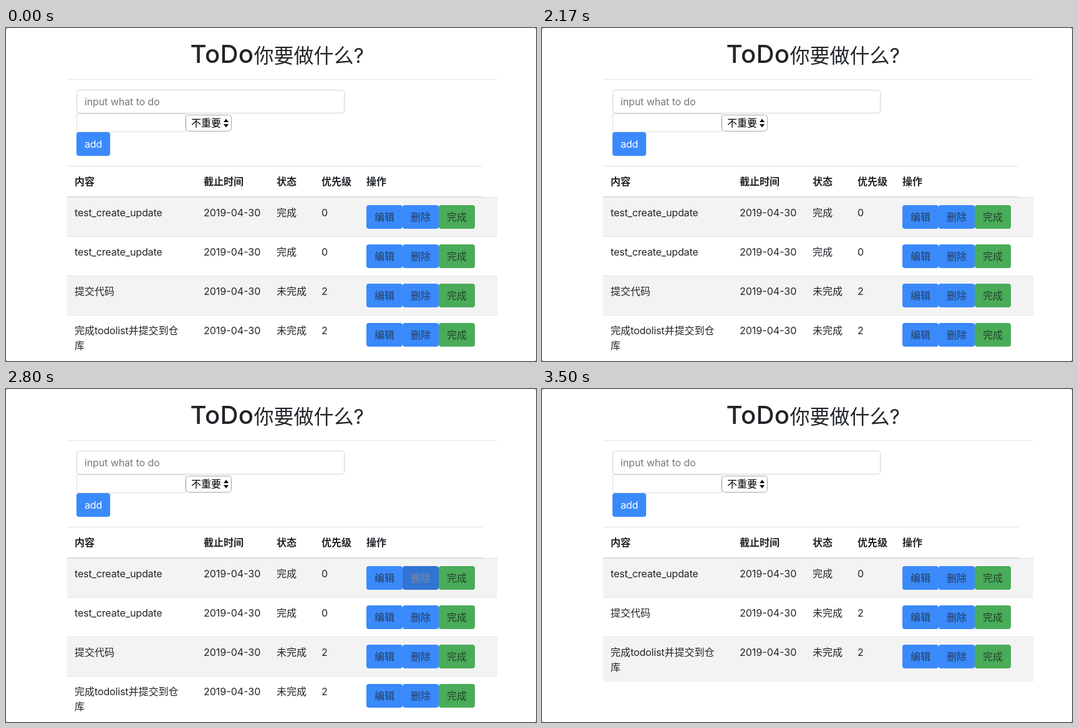
These frames come from a looping animation (850 px wide and 534 px high, 3570 ms). An HTML page:

```html
<!DOCTYPE html>
<html lang="zh-CN">
<head>
<meta charset="utf-8">
<title>ToDo</title>
<style>
html, body { margin: 0; width: 100%; height: 100%; overflow: hidden; background: #fff; }
svg { display: block; width: 850px; height: 534px; }
text { font: 400 16px Inter, "Noto Sans CJK SC", "Noto Sans CJK", sans-serif; fill: #212529; white-space: pre; }
.latin { letter-spacing: -.13px; }
.head { font-weight: 700; }
.title { font-size: 40px; font-weight: 500; letter-spacing: .4px; }
.small { font-size: 32px; }
</style>
</head>
<body>
<svg id="stage" viewBox="0 0 850 534"></svg>
<script>
const LOOP = 3570;
const HOVER_AT = 2450, HOVER_MS = 140, DELETE_AT = 2870;
const BLUE = [58, 138, 252], BLUE_HOVER = [50, 115, 211];
const INK = [40, 60, 88], INK_HOVER = [132, 138, 146];
const GREEN = '#4aac58', LINE = '#e0e2e4';
const COLS = [110, 317, 434, 506, 578];
const DATE = '2019-04-30';

const stage = document.getElementById('stage');

function add(tag, attrs, parent = stage) {
  const el = document.createElementNS('http://www.w3.org/2000/svg', tag);
  for (const key in attrs) el.setAttribute(key, attrs[key]);
  parent.appendChild(el);
  return el;
}

const rect = (x, y, width, height, attrs, parent) =>
  add('rect', { x, y, width, height, ...attrs }, parent);

// Latin runs get their own tracking so that CJK keeps its full width.
function label(x, y, str, attrs, parent) {
  const el = add('text', { x, y, ...attrs }, parent);
  for (const part of str.split(/([a-z_]+)/)) {
    if (!part) continue;
    const latin = /[a-z]/.test(part);
    add('tspan', latin ? { class: 'latin' } : {}, el).textContent = part;
  }
  return el;
}

const rgb = c => `rgb(${c.map(Math.round)})`;
const mix = (a, b, k) => a.map((v, i) => v + (b[i] - v) * k);

function button(x, y, str, fill, parent) {
  const box = rect(x, y, 58, 38, { rx: 4, fill }, parent);
  const text = label(x + 13, y + 25, str, { fill: rgb(INK) }, parent);
  return { box, text };
}

function drawPage() {
  rect(0, 0, 850, 534, { fill: '#555' });
  rect(0, 0, 850, 534, { fill: '#fff', rx: 2.5 });

  add('text', { x: 295.5, y: 56, class: 'title' }).textContent = 'ToDo';
  add('text', { x: 397.5, y: 56, class: 'small' }).textContent = '你要做什么?';
  rect(98, 82, 690, 1, { fill: '#e5e5e5' });

  rect(113.5, 99.5, 429, 37, { rx: 4, fill: '#fff', stroke: '#ced2d6' });
  label(126, 124, 'input what to do', { style: 'fill:#73797f' });

  rect(113.5, 137.5, 174, 29, { fill: '#fff', stroke: '#dcdcdc' });
  rect(288.5, 139.5, 73, 26, { rx: 5, fill: '#fff', stroke: '#a6a6a6' });
  label(297, 158, '不重要', { style: 'fill:#000' });
  add('path', { d: 'M349 151l4-5.5 4 5.5zM349 154l4 5.5 4-5.5z', fill: '#111' });

  rect(113, 167, 54, 38, { rx: 4, fill: rgb(BLUE) });
  label(126, 192, 'add', { style: 'fill:#fff' });

  rect(98, 221, 666, 1, { fill: LINE });
  ['内容', '截止时间', '状态', '优先级', '操作'].forEach((str, i) =>
    label(COLS[i], 252, str, { class: 'head' }));
}

// Each task: lines of text, state, priority.
const doneTask = [['test_create_update'], '完成', '0'];
const openTasks = [
  [['提交代码'], '未完成', '2'],
  [['完成todolist并提交到仓', '库'], '未完成', '2']
];

function drawTable(tasks) {
  const group = add('g', {});
  let y = 271, target;
  tasks.forEach(([lines, state, priority], i) => {
    const height = lines.length > 1 ? 73 : 63;
    if (i % 2 === 0) rect(98, y, 690, height, { fill: '#f3f3f3' }, group);
    rect(98, y, 690, 1, { fill: LINE }, group);
    lines.forEach((str, n) => label(COLS[0], y + 31 + n * 24, str, {}, group));
    [DATE, state, priority].forEach((str, n) =>
      label(COLS[n + 1], y + 31, str, {}, group));
    const buttons = ['编辑', '删除', '完成'].map((str, n) => {
      const b = button(578 + 58 * n, y + 13, str, n < 2 ? rgb(BLUE) : GREEN, group);
      b.text.style.fill = n < 2 ? rgb(INK) : '#24432f';
      return b;
    });
    if (i === 0) target = buttons[1];
    y += height;
  });
  rect(98, 270, 666, 1.5, { fill: '#d9dcdf' }, group);
  return { group, target };
}

drawPage();
const before = drawTable([doneTask, doneTask, ...openTasks]);
const after = drawTable([doneTask, ...openTasks]);

function render(t) {
  const deleted = t >= DELETE_AT;
  before.group.style.display = deleted ? 'none' : '';
  after.group.style.display = deleted ? '' : 'none';

  const k = Math.min(1, Math.max(0, (t - HOVER_AT) / HOVER_MS));
  const ease = k * k * (3 - 2 * k);
  const { box, text } = before.target;
  box.style.fill = rgb(mix(BLUE, BLUE_HOVER, ease));
  text.style.fill = rgb(mix(INK, INK_HOVER, ease));
}

const start = performance.now();
function tick() {
  render((performance.now() - start) % LOOP);
  requestAnimationFrame(tick);
}
tick();
</script>
</body>
</html>
```
